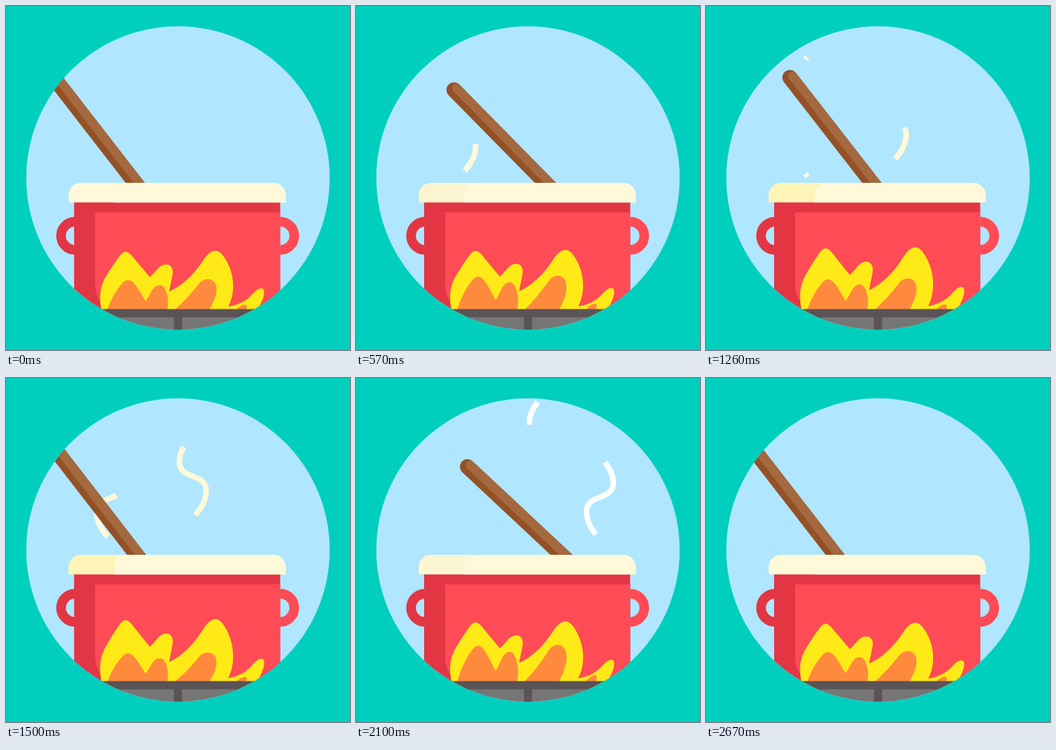
Animation, 500 px wide and 500 px high, one loop 2730 ms. Source, as an HTML page with a canvas:

```html
<!DOCTYPE html>
<html lang="en">
<head>
<meta charset="utf-8">
<title>Cooking pot</title>
<style>
html, body { margin: 0; height: 100%; overflow: hidden; background: #00cfbe; }
canvas { display: block; }
</style>
</head>
<body>
<canvas id="stage" width="500" height="500"></canvas>
<script>
const ctx = document.getElementById('stage').getContext('2d');
const LOOP = 2730, END = 2670, STEP = 30;
const RED = '#ff4b55', DARK_RED = '#e23644', CREAM = '#fff9da';

const shape = d => new Path2D(d);
const steamPath = shape('M0 0C10-11 16-22 16-35C16-63-23-50-23-78C-23-90-17-99-11-107');
const STEAM_LENGTH = 137;
const flame = shape('M141 450C135 430 135 413 143 397C150 385 160 370 167 361Q174 353 182 362L209 394C217 388 221 378 230 376C240 374 244 382 242 391L237 415C256 407 273 390 285 372C294 358 304 350 314 361C329 379 337 411 323 437C340 434 350 428 358 419C366 410 373 408 375 413C377 422 370 432 362 450Z');
const embers = shape('M146 446C151 428 161 411 171 401Q178 395 185 402C192 409 197 420 203 429C208 423 211 412 218 407Q227 403 231 411C235 419 238 430 233 446ZM240 446C258 431 270 417 280 404C288 394 301 395 305 405C309 418 301 432 293 446ZM330 446C337 438 343 434 347 434C352 434 350 439 347 446Z');
const tomato = shape('M144 209C145 190 160 179 179 180C198 182 210 199 220 210L240 228C245 233 242 240 237 244C218 259 192 258 173 248C156 239 144 227 144 209Z');
const tomatoFlesh = shape('M161 206C161 191 171 187 179 194C188 203 195 213 208 217C222 220 230 226 229 233C226 244 200 242 185 236C172 230 162 219 161 206Z');
const lettuce = shape('M278 135Q282 132 287 136L295 142Q300 138 306 138C311 126 328 123 333 135C345 135 352 137 354 142C363 147 366 153 363 162C373 172 373 186 361 191C355 194 348 192 344 196C336 202 325 198 319 190Q313 182 307 184C296 184 289 174 294 166C301 159 297 155 292 148Q286 143 279 142Q275 139 278 135Z');

// Each key: time, value...
const spoonKeys = [
  [0, 70, 105, 37.8], [360, 102, 125, 45.6], [810, 177, 114, 41.6], [1260, 122, 104, 37.9],
  [1480, 72, 103, 37.6], [1740, 90, 109, 40], [2100, 162, 129, 46.9],
  [2230, 178, 116, 42.5], [2440, 125, 103, 38.5]
];
// Height change of the flame and of its embers
const fireKeys = [
  [0, 0, 0], [360, 7, 4], [810, -5, 5], [1260, 5, 1], [1740, 4, -3], [2100, 2, 9]
];
const steams = [
  { x: 158, y: 219, at: 810, speed: .084, flip: 1, grow: [445, 842], fade: [900, 1280] },
  { x: 275, y: 222, at: 1260, speed: .095, flip: 1, grow: [1100, 1540], fade: [1790, 2220] },
  { x: 148, y: 248, at: 1260, speed: .071, flip: -1, grow: [1243, 1680], fade: [1722, 2080] },
  { x: 351, y: 247, at: 1740, speed: .048, flip: -1, grow: [1605, 2040], fade: [2090, 2500] }
];
// Rim shade until the given time
const rimShades = [
  [30, CREAM], [570, '#f8cdb7'], [1110, '#fbf4d0'], [1650, '#fff4b8'],
  [1950, CREAM], [2190, '#fcf6d2'], [LOOP, CREAM]
];

// Smooth periodic curve through the keys
function sample(keys, time) {
  const n = keys.length, t = time % END;
  const key = i => {
    const [at, ...values] = keys[(i + n) % n];
    return [at + Math.floor(i / n) * END, ...values];
  };
  let i = n - 1;
  while (keys[i][0] > t) i--;
  const [a, b, c, d] = [key(i - 1), key(i), key(i + 1), key(i + 2)];
  const span = c[0] - b[0], u = (t - b[0]) / span;
  return b.slice(1).map((from, k) => {
    const j = k + 1, to = c[j];
    const m0 = (to - a[j]) / (c[0] - a[0]) * span;
    const m1 = (d[j] - from) / (d[0] - b[0]) * span;
    return from + u * (m0 + u * (3 * (to - from) - 2 * m0 - m1 + u * (2 * (from - to) + m0 + m1)));
  });
}

const progress = (t, [from, to]) => Math.min(1, Math.max(0, (t - from) / (to - from)));

function fill(color, path) {
  ctx.fillStyle = color;
  ctx.fill(path);
}

function rect(color, x, y, w, h, radii = 0) {
  ctx.fillStyle = color;
  ctx.beginPath();
  ctx.roundRect(x, y, w, h, radii);
  ctx.fill();
}

function line(color, width, x1, y1, x2, y2) {
  ctx.strokeStyle = color;
  ctx.lineWidth = width;
  ctx.beginPath();
  ctx.moveTo(x1, y1);
  ctx.lineTo(x2, y2);
  ctx.stroke();
}

function placed(draw) {
  ctx.save();
  draw();
  ctx.restore();
}

function drawSteam(s, t) {
  const head = progress(t, s.grow), tail = progress(t, s.fade);
  if (head <= tail) return;
  placed(() => {
    ctx.translate(s.x, s.y - (t - s.at) * s.speed);
    ctx.scale(s.flip, 1);
    ctx.setLineDash([(head - tail) * STEAM_LENGTH, 999]);
    ctx.lineDashOffset = -tail * STEAM_LENGTH;
    ctx.strokeStyle = t < 1650 ? CREAM : '#fff';
    ctx.lineWidth = 8;
    ctx.stroke(steamPath);
  });
}

function drawSpoon(t) {
  const [x, y, angle] = sample(spoonKeys, t);
  placed(() => {
    ctx.translate(x, y);
    ctx.rotate(-angle * Math.PI / 180);
    ctx.lineCap = 'round';
    line('#955126', 22, 0, 0, 0, 240);
    line('#a4693f', 13, 4.5, 1, 4.5, 240);
  });
}

function falling(x, y, speed, spin, t, draw) {
  placed(() => {
    const dt = t - 360;
    ctx.translate(x, y + speed * dt);
    ctx.rotate(spin * dt);
    ctx.translate(-x, -y);
    draw();
  });
}

function drawTomato() {
  fill(RED, tomato);
  fill(DARK_RED, tomatoFlesh);
  ctx.fillStyle = '#ffc61b';
  const seeds = [[169, 205, 0], [171, 213, -.5], [177, 217, -.8], [183, 224, -.9],
    [189, 227, -1.1], [197, 230, 1.4], [207, 232, 1.3], [218, 233, .9]];
  for (const [x, y, angle] of seeds) {
    ctx.beginPath();
    ctx.ellipse(x, y, 4, 2.2, angle, 0, 7);
    ctx.fill();
  }
}

function drawLettuce() {
  fill('#91d52a', lettuce);
  ctx.lineCap = 'round';
  line('#8cce27', 4, 290, 143, 336, 165);
}

function drawHandle(x, color, from, to) {
  ctx.strokeStyle = color;
  ctx.lineWidth = 14;
  ctx.beginPath();
  ctx.arc(x, 334, 20.5, from, to);
  ctx.stroke();
}

function drawPot(t) {
  const q = Math.PI / 2;
  drawHandle(100.5, DARK_RED, q, 3 * q);
  drawHandle(398.5, RED, -q, q);
  rect(DARK_RED, 99, 285, 299.5, 170);
  rect(RED, 129.5, 300, 269, 150, [0, 0, 0, 45]);
  rect(rimShades.find(([until]) => t < until)[1], 91, 257, 315.5, 28.5, [18, 18, 0, 0]);
  rect(CREAM, 157.5, 257, 249, 28.5, [16, 18, 0, 0]);
}

function drawFire(t) {
  const [flameRise, emberRise] = sample(fireKeys, t);
  const layer = (color, path, base, scale) => placed(() => {
    ctx.translate(0, base);
    ctx.scale(1, scale);
    ctx.translate(0, -base);
    fill(color, path);
  });
  layer('#ffea17', flame, 450, 1 + flameRise / 94);
  layer('#ff8a3d', embers, 446, 1 + emberRise / 48);
}

function drawStove() {
  rect('#767676', 30, 452, 440, 20);
  rect('#5a5456', 30, 440.5, 440, 12);
  rect('#5a5456', 244, 452, 12, 20);
}

function draw(t) {
  ctx.fillStyle = '#00cfbe';
  ctx.fillRect(0, 0, 500, 500);
  placed(() => {
    ctx.beginPath();
    ctx.arc(250, 250, 220.5, 0, 7);
    ctx.clip();
    rect('#b0e6ff', 0, 0, 500, 500);
    steams.forEach(s => drawSteam(s, t));
    drawSpoon(t);
    if (t < 600) {
      falling(325, 162, .65, .0015, t, drawLettuce);
      falling(194, 217, .7, -.0015, t, drawTomato);
    }
    drawPot(t);
    drawFire(t);
    drawStove();
  });
}

const start = performance.now();
function tick() {
  const t = (performance.now() - start) % LOOP;
  draw(Math.min(END, Math.floor(t / STEP) * STEP));
  requestAnimationFrame(tick);
}
tick();
</script>
</body>
</html>
```
